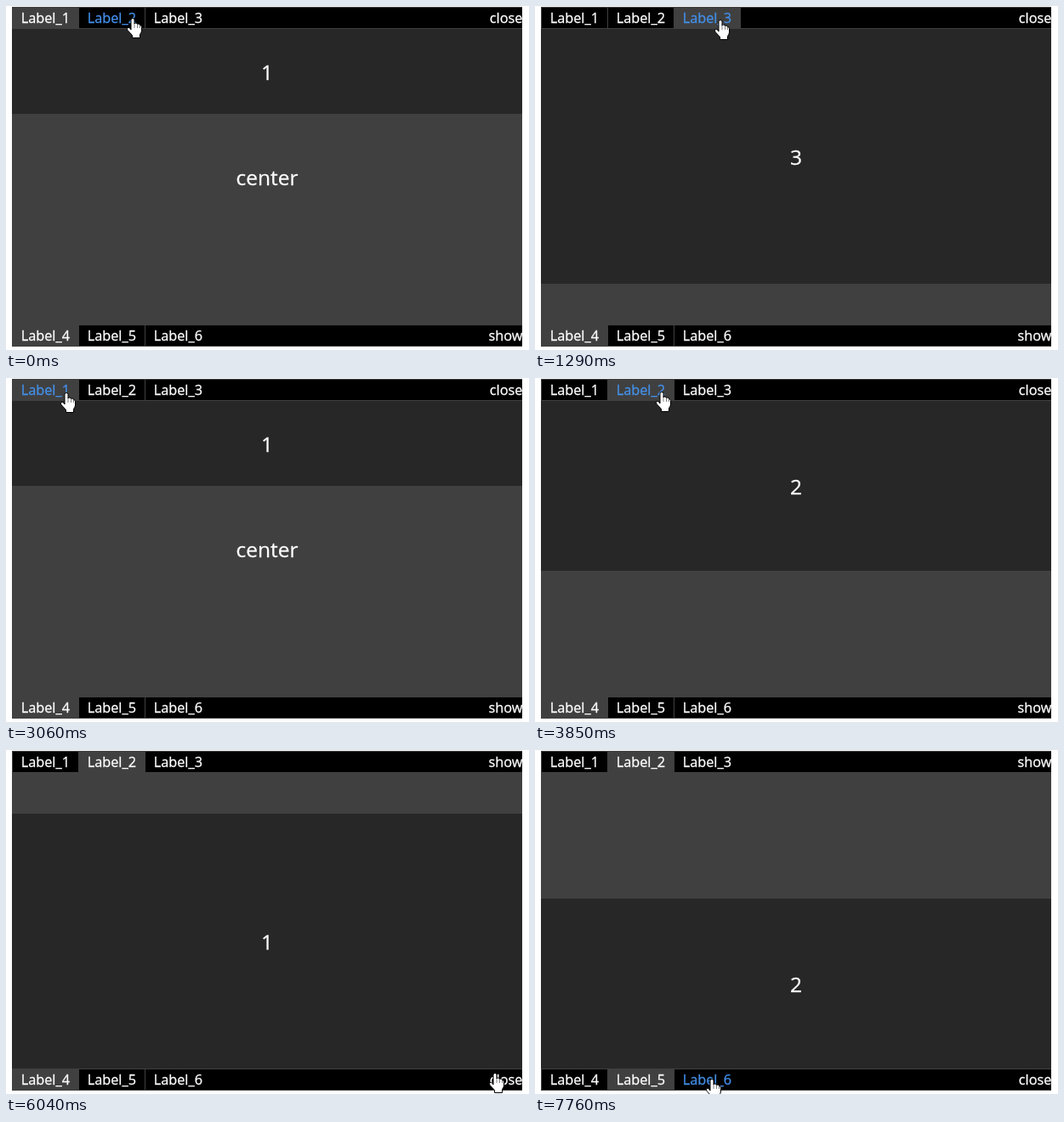
Recreate the animation shown at these times as an HTML page. Size 615 by 405 pixels, loop 8000 ms.

```html
<!DOCTYPE html>
<html lang="en">
<head>
<meta charset="utf-8">
<title>Drawer tabs</title>
<style>
  html, body { margin: 0; width: 615px; height: 405px; overflow: hidden; background: #fff; }
  svg { display: block; }
  rect { shape-rendering: crispEdges; }
  text {
    font: 16.3px "Open Sans", "Noto Sans", sans-serif;
    fill: #fff; stroke: #fff; stroke-width: .3px;
  }
  .big { font-size: 24.5px; text-anchor: middle; }
  .end { text-anchor: end; }
  .hover { fill: #4390ea; stroke: #4390ea; }
  .cursor { fill: #fff; stroke: #000; stroke-linejoin: round; }
</style>
</head>
<body>
<svg id="stage" width="615" height="405" viewBox="0 0 615 405"></svg>
<script>
const LOOP = 8000, TICK = 135;
const GREY = '#404040', DARK = '#272727', BLACK = '#000';
const LEFT = 7, WIDTH = 600, TAB = 78, BAR = 24, TOGGLE_X = 567;
const BAR_Y = [2, 376];
const stage = document.getElementById('stage');

// Each move glides to a point and then clicks what lies there.
const moves = [
  { leave: 0, arrive: 0, x: 150, y: 15, click: 150 },
  { leave: 150, arrive: 420, x: 219, y: 17, click: 1290 },
  { leave: 1570, arrive: 1840, x: 150, y: 17, click: 2110 },
  { leave: 2260, arrive: 2780, x: 72, y: 18, click: 3060 },
  { leave: 3330, arrive: 3590, x: 150, y: 17, click: 3850 },
  { leave: 3970, arrive: 4640, x: 581, y: 19, click: 4790 },
  { leave: 5070, arrive: 5740, x: 576, y: 381, click: 6040 },
  { leave: 6200, arrive: 7020, x: 140, y: 386, click: 7330 },
  { leave: 7480, arrive: 7760, x: 209, y: 388, click: LOOP }
];

const smooth = p => p * p * (3 - 2 * p);

function pointerAt(t) {
  const i = moves.findLastIndex(m => m.leave <= t);
  const to = moves[i], from = moves[i - 1];
  if (!from || t >= to.arrive) return to;
  const span = to.arrive - to.leave;
  const steps = Math.round(span / TICK);
  const done = Math.floor((t - to.leave) / span * steps) + 1;
  const p = smooth(done / (steps + 1));
  return {
    x: Math.round(from.x + (to.x - from.x) * p),
    y: Math.round(from.y + (to.y - from.y) * p)
  };
}

// The bar and the tab (or toggle) under a point, if any.
function hit({ x, y }) {
  const bar = BAR_Y.findIndex(top => y >= top && y < top + BAR);
  const tab = Math.floor((x - LEFT) / TAB);
  if (bar < 0) return null;
  if (x >= TOGGLE_X) return { bar, toggle: true };
  return tab < 3 ? { bar, tab } : null;
}

function stateAt(t) {
  const state = [{ tab: 0, open: true }, { tab: 0, open: false }];
  for (const move of moves) {
    if (move.click > t) break;
    const { bar, tab, toggle } = hit(move);
    if (toggle) state[bar].open = !state[bar].open;
    else state[bar].tab = tab;
  }
  return state;
}

function add(tag, attrs, content = '') {
  const el = document.createElementNS('http://www.w3.org/2000/svg', tag);
  for (const key in attrs) el.setAttribute(key, attrs[key]);
  el.textContent = content;
  return stage.appendChild(el);
}
const box = (x, y, width, height, fill) => add('rect', { x, y, width, height, fill });
const label = (x, y, text, cls = '') => add('text', { x, y, class: cls }, text);
const show = (el, on) => el.setAttribute('visibility', on ? 'visible' : 'hidden');
const place = (el, x, y) => el.setAttribute('transform', `translate(${x} ${y})`);

function makePanel() {
  return { back: box(LEFT, 0, WIDTH, 0, DARK), digit: label(307, 0, '', 'big') };
}

function makeBar(y, index) {
  box(LEFT, y - 1, WIDTH, BAR + 2, GREY);
  box(LEFT + 1, y, WIDTH - 1, BAR, BLACK);
  const tabs = [0, 1, 2].map(i => {
    const x = LEFT + TAB * i;
    box(x, y, 1, BAR, GREY);
    return {
      back: box(x, y, TAB + 1, BAR, GREY),
      text: label(x + 10.7, y + 18, 'Label_' + (index * 3 + i + 1))
    };
  });
  return { tabs, toggle: label(607.4, y + 18, '', 'end') };
}

box(LEFT, 1, WIDTH, 400, GREY);
label(307, 211, 'center', 'big');
const panels = BAR_Y.map(makePanel);
const bars = BAR_Y.map(makeBar);

const hand = add('g', { class: 'cursor' });
hand.append(
  add('path', { d: 'M5 14V2.2Q5 .5 7 .5T9 2.2V7Q9 6 10.7 6T12.5 7.5Q12.5 7 14 7T15.5 8.6Q17.5 8.6 17.5 10.5V15Q17.5 17 15.5 19.5V23.5H6.5V20.5L1 14.5Q0 12.5 1 11.6T3.6 12Z' }),
  add('path', { d: 'M9 7V12M12.5 8V12M15.5 9V12', 'stroke-width': .5 })
);
const arrow = add('path', { class: 'cursor', d: 'M.5 .5V16.5L4.2 13L6.8 18.8L9.2 17.7L6.7 12H11.5Z' });

function drawPanel({ back, digit }, { tab, open }, isTop) {
  const height = 100 * (isTop ? tab + 1 : 3 - tab);
  const y = isTop ? 27 : 375 - height;
  show(back, open);
  show(digit, open);
  back.setAttribute('y', y);
  back.setAttribute('height', height);
  digit.setAttribute('y', y + height / 2 + 10);
  digit.textContent = tab + 1;
}

function drawBar({ tabs, toggle }, { tab, open }, hovered) {
  tabs.forEach(({ back, text }, i) => {
    show(back, i === tab);
    text.setAttribute('class', i === hovered ? 'hover' : '');
  });
  toggle.textContent = open ? 'close' : 'show';
}

function draw(t) {
  const tip = pointerAt(t);
  const over = hit(tip);
  stateAt(t).forEach((state, i) => {
    drawPanel(panels[i], state, i === 0);
    drawBar(bars[i], state, over?.bar === i ? over.tab : -1);
  });
  show(hand, over);
  show(arrow, !over);
  place(hand, tip.x - 8, tip.y - 1);
  place(arrow, tip.x, tip.y);
}

const start = performance.now();
function tick() {
  draw((performance.now() - start) % LOOP);
  requestAnimationFrame(tick);
}
tick();
</script>
</body>
</html>
```
